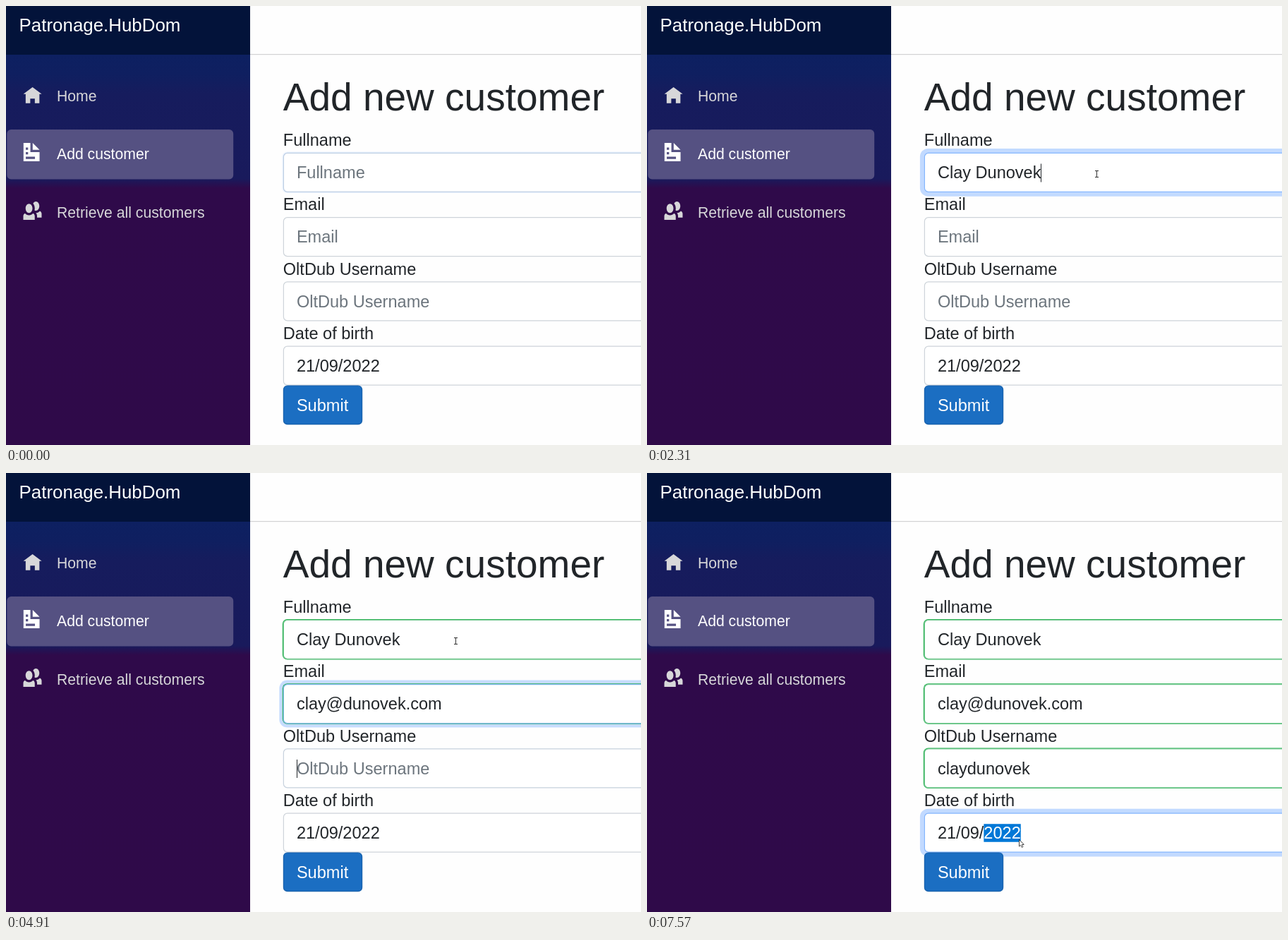
An HTML page with a canvas for the animation above (8 s loop, 900 by 622 pixels).

```html
<!DOCTYPE html>
<html lang="en">
<head>
<meta charset="utf-8">
<title>Add new customer</title>
<style>
html, body { margin: 0; width: 100%; height: 100%; overflow: hidden; background: #fff; }
canvas { display: block; }
</style>
</head>
<body>
<canvas id="stage" width="900" height="622"></canvas>
<script>
const ctx = document.getElementById('stage').getContext('2d');
const LOOP = 8000, FADE = 150;
const BODY = 23.55, LEFT = 392.8, INSET = 411.9, ROW = 91.25;
const INK = '#212529', MUTED = '#6c757d';
const GRAY = [206, 212, 218], BLUE = [134, 183, 254], GREEN = [120, 201, 148];

// on/off: focus span; keys: the moment each character is typed
const fields = [
  { label: 'Fullname', text: 'Clay Dunovek', on: 505, off: 2500,
    keys: [1010, 1110, 1260, 1310, 1510, 1660, 1760, 1910, 2060, 2160, 2260, 2310] },
  { label: 'Email', text: 'clay@dunovek.com', on: 2500, off: 4905,
    keys: [2760, 2860, 2910, 3060, 3310, 3560, 3660, 3810, 3860, 3960, 4010, 4160, 4360, 4510, 4610, 4710] },
  { label: 'OltDub Username', text: 'claydunovek', on: 4905, off: 7410,
    keys: [5260, 5410, 5510, 5610, 5820, 5870, 6070, 6220, 6320, 6420, 6520] },
  { label: 'Date of birth', text: '21/09/2022', on: 7410, off: Infinity, keys: null }
];

// time, x, y
const pointerPath = [
  [45, 800, 541], [200, 690, 267], [350, 690, 267], [480, 637.5, 238], [6830, 637.5, 238],
  [7070, 590, 571], [7170, 572.5, 562.5], [7370, 527, 519]
];

const icons = {
  home: 'M4 0l-4 3h1v4h2v-2h2v2h2v-4.03l1 .03-4-3z',
  file: 'M0 0v8h7v-4h-4v-4h-3zm4 0v3h3l-3-3zm-3 2h1v1h-1v-1zm0 2h1v1h-1v-1zm0 2h4v1h-4v-1z',
  people: 'M5.5 0c-.51 0-.95.35-1.22.88.45.54.72 1.28.72 2.13 0 .29-.03.55-.09.81.19.11.38.19.59.19.83 0 1.5-.9 1.5-2s-.67-2-1.5-2z' +
    'M2.5 1c-.83 0-1.5.9-1.5 2s.67 2 1.5 2 1.5-.9 1.5-2-.67-2-1.5-2z' +
    'M7.25 4.16c-.43.51-1.02.82-1.69.84.27.38.44.84.44 1.34v.66h2v-1.66c0-.52-.31-.97-.75-1.19z' +
    'M.75 5.16c-.44.22-.75.67-.75 1.19v1.66h5v-1.66c0-.52-.31-.97-.75-1.19-.45.53-1.06.84-1.75.84s-1.3-.32-1.75-.84z'
};

const clamp = x => Math.min(1, Math.max(0, x));
const ease = x => 1 - (1 - clamp(x)) ** 2;
const mix = (a, b, p) => `rgb(${a.map((v, i) => v + (b[i] - v) * p)})`;

function setFont(size) {
  ctx.font = `${size}px "Liberation Sans", Arial, sans-serif`;
}

function write(text, x, y, size, color) {
  setFont(size);
  ctx.fillStyle = color;
  ctx.fillText(text, x, y);
}

function rect(x, y, w, h, color) {
  ctx.fillStyle = color;
  ctx.fillRect(x, y, w, h);
}

function rounded(x, y, w, h, r, fill, stroke) {
  ctx.beginPath();
  ctx.roundRect(x, y, w, h, r);
  if (fill) { ctx.fillStyle = fill; ctx.fill(); }
  if (stroke) { ctx.strokeStyle = stroke; ctx.lineWidth = 1.2; ctx.stroke(); }
}

function navItem(icon, label, iconX, iconY, baseline, color) {
  ctx.save();
  ctx.translate(iconX, iconY);
  ctx.scale(3.25, 3.25);
  ctx.fillStyle = color;
  ctx.fill(new Path2D(icons[icon]));
  ctx.restore();
  write(label, 72, baseline, 21.2, color);
}

function drawSidebar() {
  const shade = ctx.createLinearGradient(0, 69, 0, 622);
  [[0, '#0d2061'], [.05, '#0f1f60'], [.1, '#161c5d'], [.318, '#191a5c'], [.342, '#2f0a4a'], [1, '#2f0a49']]
    .forEach(([at, color]) => shade.addColorStop(at, color));
  rect(0, 0, 346, 622, shade);
  rect(0, 0, 346, 69, '#03133a');
  write('Patronage.HubDom', 18.6, 36, 25.9, '#fff');
  rounded(1.3, 175, 320.9, 70.5, 5.9, '#555182');
  navItem('home', 'Home', 24.6, 115, 135, '#d7d7d9');
  navItem('file', 'Add customer', 24.8, 194, 217.3, '#fff');
  navItem('people', 'Retrieve all customers', 24.5, 277, 299.8, '#d7d7d9');
}

function drawField(field, i, t) {
  const top = 208.2 + ROW * i, base = 244.2 + ROW * i;
  const focused = t >= field.on && t < field.off;
  let glow = ease((t - field.on) / FADE) - ease((t - field.off) / FADE);
  if (i === 0 && t < FADE) glow = .25 * (1 - t / FADE);
  const valid = t >= field.off;

  write(field.label, LEFT, base - 46, BODY, INK);
  if (glow > 0) {
    const s = 5.9 * glow;
    rounded(LEFT - s, top - s - .4, 600, 56 + 2 * s, 5.9 + s, `rgba(13,110,253,${.25 * glow})`);
  }
  if (valid) rounded(LEFT - 1, top - 1.2, 600, 57.4, 6.9, '#26b050');
  rounded(LEFT + .6, top + .2, 600, 54.9, 5.4, '#fff', mix(valid ? GREEN : GRAY, BLUE, glow));

  if (!field.keys) {
    write(field.text, INSET, base, BODY, INK);
    if (focused) {
      const x = INSET + ctx.measureText('21/09/').width;
      rect(x, base - 20.7, ctx.measureText('2022').width, 25.5, '#0078d7');
      write('2022', x, base, BODY, '#fff');
    }
    return;
  }

  const count = field.keys.filter(key => t >= key).length;
  const typed = field.text.slice(0, count);
  write(typed || field.label, INSET, base, BODY, typed ? INK : MUTED);
  const lastKey = count ? field.keys[count - 1] : field.on;
  if (focused && (t - lastKey) % 1000 < 500) {
    rect(Math.round(INSET + ctx.measureText(typed).width), top + 15.3, 1, 26, INK);
  }
}

function drawPointer(t) {
  if (t < pointerPath[0][0]) return;
  let [, x, y] = pointerPath.at(-1);
  const next = pointerPath.findIndex(point => point[0] > t);
  if (next > 0) {
    const [t0, x0, y0] = pointerPath[next - 1], [t1, x1, y1] = pointerPath[next];
    const p = (t - t0) / (t1 - t0);
    x = x0 + (x1 - x0) * p;
    y = y0 + (y1 - y0) * p;
  }
  const row = (y - 208) / ROW;
  const overText = row >= 0 && row < 3 && row % 1 < .61;
  ctx.save();
  ctx.translate(x, y);
  ctx.strokeStyle = '#333';
  ctx.lineWidth = 1;
  ctx.stroke(new Path2D(overText
    ? 'M-2.5-4.5H2.5M0-4.5V4.5M-2.5 4.5H2.5'
    : 'M.5.5V10L2.7 8 4.3 11.4 5.8 10.7 4.3 7.4H7.2Z'));
  if (!overText) {
    ctx.fillStyle = '#fff';
    ctx.fill(new Path2D('M.9 1.6V9L2.9 7.2 4.5 10.7 5.2 10.4 3.7 7H6.2Z'));
  }
  ctx.restore();
}

function draw(now) {
  const t = now % LOOP;
  rect(0, 0, 900, 622, '#fefefe');
  rect(346, 68, 554, 1.2, '#d2d2d4');
  drawSidebar();
  write('Add new customer', LEFT, 147.5, 55, INK);
  fields.forEach((field, i) => drawField(field, i, t));
  rounded(LEFT + .6, 538, 111.2, 54.6, 5.4, '#1b6ec2', '#1861ac');
  write('Submit', INSET, 574, BODY, '#fff');
  drawPointer(t);
  requestAnimationFrame(draw);
}
requestAnimationFrame(draw);
</script>
</body>
</html>
```
